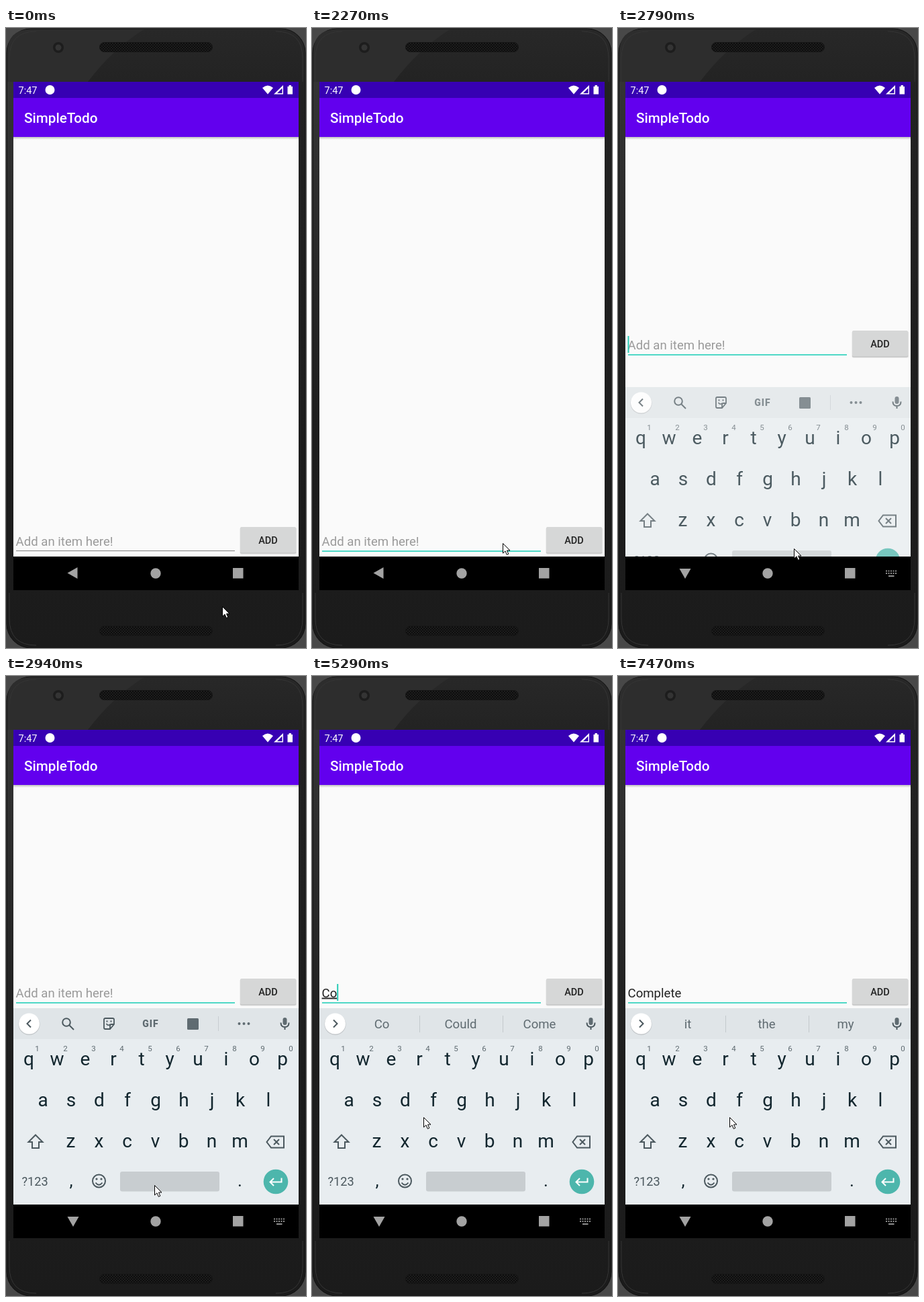
Recreate the animation shown at these times as an HTML page. Size 447x922 px, loop 8 s.

```html
<!DOCTYPE html>
<html lang="en">
<head>
<meta charset="utf-8">
<title>Todo app demo</title>
<style>
  html, body { margin: 0; width: 100%; height: 100%; overflow: hidden; background: #1d1d1d; }
  svg { display: block; width: 447px; height: 922px; }
  text { font-family: Roboto, "Liberation Sans", sans-serif; white-space: pre; }
  .mid { text-anchor: middle; }
  .body { font-size: 18.6px; }
  .line { fill: none; stroke: #4b585e; stroke-width: 2; }
  .grey { fill: #5f6b71; }
</style>
</head>
<body>
<svg viewBox="0 0 447 922">
  <defs>
    <linearGradient id="shell" x2="0" y2="1">
      <stop offset="0" stop-color="#282828"/>
      <stop offset=".1" stop-color="#222"/>
      <stop offset="1" stop-color="#1b1b1b"/>
    </linearGradient>
    <linearGradient id="edge" x2="0" y2="1">
      <stop offset="0" stop-color="#343434"/>
      <stop offset="1" stop-color="#1e1e1e"/>
    </linearGradient>
    <linearGradient id="drop" x2="0" y2="1">
      <stop offset="0" stop-color="#bdbdbd"/>
      <stop offset="1" stop-color="#fafafa"/>
    </linearGradient>
    <pattern id="mesh" width="4" height="4" patternUnits="userSpaceOnUse">
      <rect width="4" height="4" fill="#0d0d0d"/>
      <circle cx="1" cy="1" r=".8" fill="#303030"/>
      <circle cx="3" cy="3" r=".8" fill="#303030"/>
    </pattern>
    <clipPath id="screen"><rect x="11" y="162" width="425" height="624"/></clipPath>
  </defs>

  <!-- phone -->
  <rect width="447" height="922" fill="#484848"/>
  <rect x="1" y="1" width="445" height="921" rx="36" fill="url(#shell)" stroke="#111"/>
  <path d="M37 2H206Q160 30 122 80H2V37Q2 2 37 2" fill="#2d2d2d"/>
  <rect x="2" y="80" width="9" height="504" fill="url(#edge)"/>
  <path d="M5 80V45Q5 5 45 5M442 80V45Q442 5 402 5M5 840V878Q5 918 45 918M442 840V878Q442 918 402 918"
        fill="none" stroke="#353535"/>
  <circle cx="78" cy="29" r="8" fill="#1d1d1d"/>
  <circle cx="78" cy="29" r="4.5" fill="#343434"/>
  <g fill="url(#mesh)" stroke="#151515">
    <rect x="139.5" y="21.5" width="168" height="14" rx="7"/>
    <rect x="139.5" y="889.5" width="168" height="14" rx="7"/>
  </g>

  <!-- app bars -->
  <rect x="11" y="80" width="425" height="24" fill="#3700b3"/>
  <rect x="11" y="104" width="425" height="58" fill="#6200ee"/>
  <rect x="11" y="162" width="425" height="624" fill="#fafafa"/>
  <rect x="11" y="162" width="425" height="4" fill="url(#drop)"/>
  <g fill="#fff">
    <text x="18.5" y="97.5" font-size="14.5">7:47</text>
    <circle cx="65.500" cy="92" r="7"/>
    <path d="M382 89Q390 82 398 89L390 98.500Z"/>
    <path d="M399 98.500L413 85V98.500ZM404 97H411.500V89.500Z" fill-rule="evenodd"/>
    <path d="M419.500 87H421.500V85H425V87H427V98.500H419.500Z"/>
    <text x="27" y="141" font-size="20.7" font-weight="500">SimpleTodo</text>
  </g>

  <g clip-path="url(#screen)">
    <!-- entry row -->
    <g id="row">
      <rect id="rule" x="15" width="326"/>
      <text id="entry" class="body" x="14.600" y="769.500"></text>
      <rect id="caret" y="750" width="2" height="25" fill="#26cbb5"/>
      <rect x="348.500" y="743" width="84.500" height="39.500" rx="2.500" fill="#000" opacity=".1"/>
      <rect x="349" y="742.500" width="83" height="39" rx="2" fill="#000" opacity=".16"/>
      <rect x="349" y="742" width="83" height="38.500" rx="2" fill="#d6d7d7"/>
      <text class="mid" x="390.500" y="767" font-size="14.5" font-weight="500" fill="#212121">ADD</text>
    </g>

    <!-- keyboard -->
    <g id="board">
      <rect x="11" y="494" width="425" height="292" fill="#e8edf0"/>
      <rect x="11" y="494" width="425" height="46" fill="#e0e5e8"/>
      <circle cx="34.500" cy="518" r="16" fill="#000" opacity=".13"/>
      <circle cx="34.500" cy="517" r="15.500" fill="#fff"/>
      <path id="chevron" class="line"/>
      <g id="tools">
        <g class="line" stroke="#5f6b71">
          <circle cx="90" cy="515" r="5.800"/>
          <path d="M94.500 519.500L101 526"/>
          <path d="M148 509H159Q161 509 161 511V518L155 525H148Q146 525 146 523V511Q146 509 148 509M161 518H157Q155 518 155 520V525" stroke-width="1.800"/>
          <path d="M149.500 517Q152 521 155 518" stroke-width="1.500"/>
        </g>
        <g class="grey">
          <circle cx="150.500" cy="513.500" r="1.200"/>
          <circle cx="156.500" cy="513.500" r="1.200"/>
          <text class="mid" x="215.500" y="522" font-size="14" font-weight="900" letter-spacing="1">GIF</text>
          <rect x="270" y="509" width="17" height="17" rx="1.500"/>
          <circle cx="347.500" cy="517" r="2"/>
          <circle cx="354.500" cy="517" r="2"/>
          <circle cx="361.500" cy="517" r="2"/>
        </g>
        <path d="M316.500 506V528" stroke="#c8cdd1"/>
      </g>
      <g id="words" class="mid body grey">
        <path d="M160.500 505V530M284.500 505V530" stroke="#c3c9cc"/>
        <text x="104" y="524"></text>
        <text x="221.500" y="524"></text>
        <text x="339" y="524"></text>
      </g>
      <rect class="grey" x="412.500" y="508" width="6" height="11" rx="3"/>
      <path class="line" d="M409.500 515.500Q409.500 522 415.500 522T421.500 515.500M415.500 522V526" stroke-width="1.800"/>
      <g id="keys" class="mid" fill="#12262e"></g>
      <path class="line" d="M44 682.500L54.500 693H49V702H39V693H33.500Z"/>
      <path class="line" d="M395 684.500H414V701.500H395L388.500 693ZM399 689L407 697M407 689L399 697"/>
      <text x="23.500" y="758" font-size="18.2" fill="#4b585e">?123</text>
      <circle class="line" cx="138.500" cy="751" r="9.500"/>
      <path class="line" d="M133.500 753.500Q138.500 760 143.500 753.500"/>
      <circle cx="135" cy="748" r="1.600" fill="#4b585e"/>
      <circle cx="142" cy="748" r="1.600" fill="#4b585e"/>
      <rect x="170" y="737" width="148" height="29.500" rx="3" fill="#c8cdd0"/>
      <circle cx="402" cy="752" r="18.300" fill="#4db6ac"/>
      <path d="M410.500 746.500V752.500H394M399 747L393.500 752.500L399 758" fill="none" stroke="#fff" stroke-width="2"/>
    </g>
  </g>

  <!-- navigation bar -->
  <rect x="11" y="786" width="425" height="50"/>
  <g fill="#a3a3a3">
    <path id="back" d="M-8.500 0L6.500 -8.500V8.500Z"/>
    <circle cx="223" cy="811" r="7.700"/>
    <rect x="338" y="803" width="15.500" height="15.500"/>
    <g id="imeIcon" fill="none" stroke="#8f8f8f" stroke-width="2">
      <path d="M399 807.500H415.500M399 811H415.500" stroke-dasharray="2 1.500"/>
      <path d="M403 815H411.500"/>
    </g>
  </g>

  <path id="mouse" d="M.5 .5V15L4 11.800L6.300 17.300L8.800 16.200L6.500 11H11Z" fill="#fff" stroke="#000"/>
</svg>

<script>
const LOOP = 8000;
const $ = id => document.getElementById(id);

// Each track lists [start ms, ...values]; a value holds until the next start.
const mouse = [
  [0, 322, 860], [150, 331, 844], [270, 346, 819], [390, 358, 802],
  [540, 370, 787], [660, 384, 773], [780, 394, 763], [930, 400, 734],
  [1240, 337, 709], [1360, 316, 697], [1480, 301, 695], [1600, 291, 712],
  [1720, 286, 740], [1840, 284, 761], [1990, 284, 766],
  [2790, 262, 774], [2940, 221, 757], [3940, 193, 682], [4080, 168, 640],
  [4210, 143, 599], [4350, 161, 651], [4490, 166, 656]
];
const typed = [
  [0, ""], [5030, "C"], [5170, "Co"], [5440, "Com"], [6110, "Comp"],
  [6230, "Compl"], [6370, "Comple"], [6630, "Complet"], [6920, "Complete "]
];
const hints = [
  [0], [5290, "Co", "Could", "Come"], [5440, "Com", "Come", "Coming"],
  [6230, "Compl", "Complete", "Completely"], [6370, "Comple", "Complete", "Completely"],
  [6780, "Complet", "Complete", "Completely"], [6920, "Complete", "Completely", "Completed"],
  [7070, "it", "the", "my"]
];
const caretOn = [
  [0, false], [2550, true], [2940, false], [3480, true], [4080, false],
  [4490, true], [5970, false], [6110, true], [7470, false]
];
const backTurn = [[0, 0], [2670, 84], [2790, -90]];
const boardPose = [[0, 0, 0], [2670, 292, 0], [2790, 40, .75], [2940, 0, 1]];

const at = (track, t) => track.findLast(step => step[0] <= t).slice(1);

function label(x, y, size, str, fill) {
  const el = document.createElementNS("http://www.w3.org/2000/svg", "text");
  const attrs = { x, y, "font-size": size };
  if (fill) attrs.fill = fill;
  for (const k in attrs) el.setAttribute(k, attrs[k]);
  el.textContent = str;
  $("keys").append(el);
}

[["qwertyuiop", 34, 579], ["asdfghjkl", 55, 639.5], ["zxcvbnm", 96.5, 700.5]].forEach(([row, x, y], r) =>
  [...row].forEach((key, i) => {
    label(x + 42 * i, y, 28, key);
    if (!r) label(x + 12.5 + 42 * i, 558, 11.5, (i + 1) % 10, "#5f6b71");
  }));
label(97, 759, 26, ",");
label(348.5, 759, 26, ".");

const set = (el, attrs) => { for (const k in attrs) el.setAttribute(k, attrs[k]); };
const show = (el, on) => { el.style.display = on ? "" : "none"; };
const words = $("words").querySelectorAll("text");

function draw(t) {
  const [mx, my] = at(mouse, t);
  const [text] = at(typed, t);
  const tips = at(hints, t);
  const [turn] = at(backTurn, t);
  const [drop, alpha] = at(boardPose, t);
  const focused = t >= 2270, raised = t >= 2550;

  set($("mouse"), { transform: `translate(${mx} ${my})` });
  set($("back"), { transform: `translate(100 810.5) rotate(${turn})` });
  show($("imeIcon"), raised);

  set($("row"), { transform: `translate(0 ${raised ? -292 : 0})` });
  set($("rule"), focused
    ? { y: 777, height: 2, fill: "#4fd8c6" }
    : { y: 777, height: 1, fill: "#828282" });

  const entry = $("entry");
  entry.textContent = text || "Add an item here!";
  set(entry, { fill: text ? "#212121" : "#9a9a9a" });
  entry.style.textDecoration = text && !text.endsWith(" ") ? "underline" : "none";
  set($("caret"), { x: 14.5 + (text ? entry.getComputedTextLength() : 0) });
  show($("caret"), at(caretOn, t)[0]);

  set($("board"), { transform: `translate(0 ${drop})`, opacity: alpha });
  const tipping = tips.length > 0;
  show($("tools"), !tipping);
  show($("words"), tipping);
  set($("chevron"), { d: tipping ? "M32 511.500L37.500 517L32 522.500" : "M37 511.500L31.500 517L37 522.500" });
  const strong = t >= 6230 && t < 6920;
  words.forEach((el, i) => {
    el.textContent = tips[i] || "";
    if (i === 1) set(el, { "font-weight": strong ? 700 : 400, style: strong ? "fill:#000" : "" });
  });
}

const start = performance.now();
function tick() {
  draw((performance.now() - start) % LOOP);
  requestAnimationFrame(tick);
}
tick();
</script>
</body>
</html>
```
